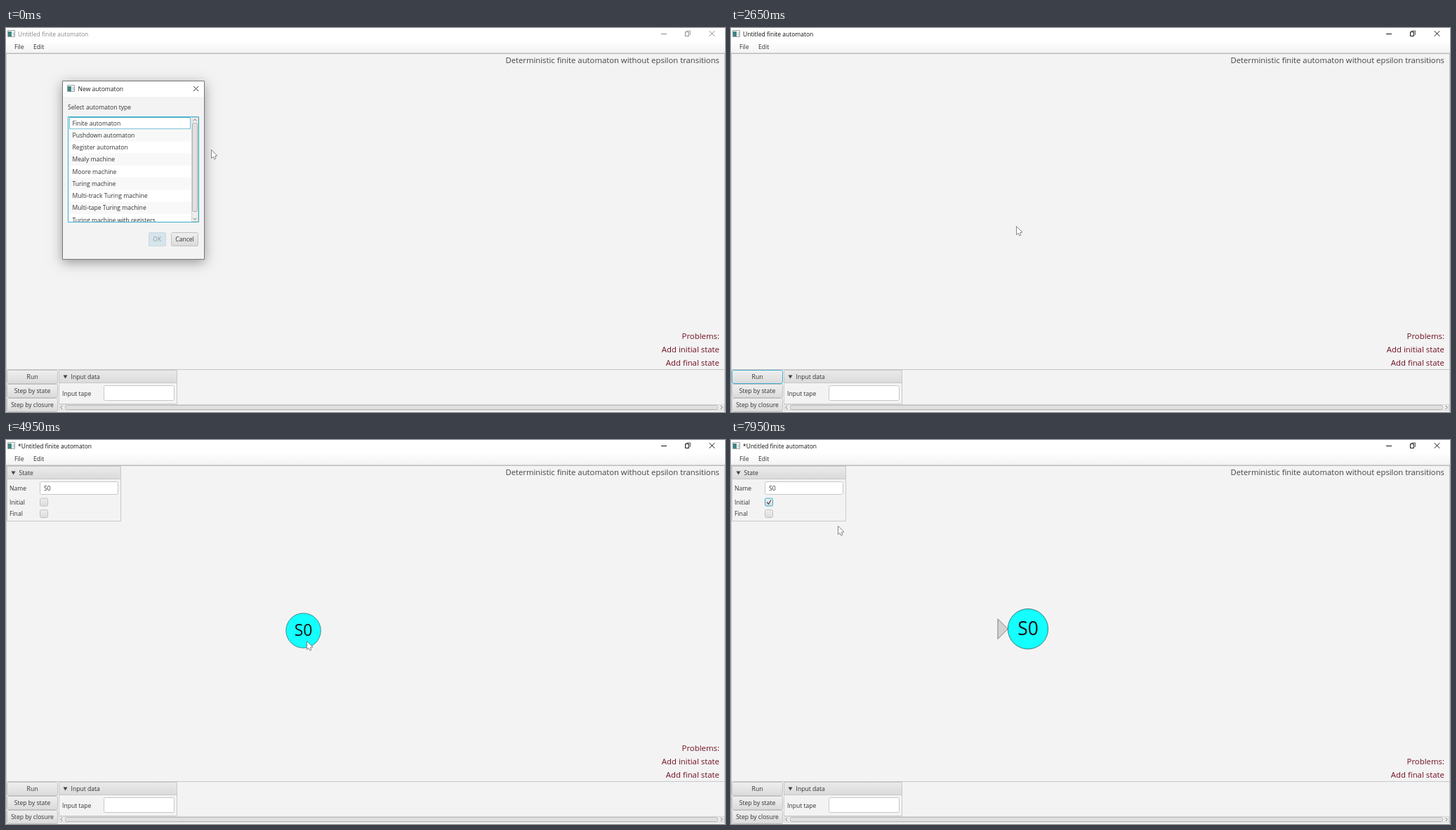
Animation of 1024 by 547 pixels, one loop 8000 ms. Source, as an HTML page with a canvas:

```html
<!DOCTYPE html>
<html lang="en">
<head>
<meta charset="utf-8">
<title>Automaton editor</title>
<style>
html, body { margin: 0; width: 100%; height: 100%; overflow: hidden; background: #f3f3f3; }
canvas { display: block; }
</style>
</head>
<body>
<canvas id="stage" width="1024" height="547"></canvas>
<script>
const ctx = document.getElementById('stage').getContext('2d');
const LOOP = 8000, STEP = 50;
const BLUE = '#159fc4', RING = '#3aaecd', PANE = '#f3f3f3', EDGE = '#c2c2c2', INK = '#333';
const ROW = 17.25;

const clamp = (v, lo, hi) => Math.min(hi, Math.max(lo, v));
const mix = (a, b, k) => a + (b - a) * k;
const ease = k => k * k * (3 - 2 * k);
const progress = (t, from, to) => clamp((t - from) / (to - from), 0, 1);

const TYPES = ['Finite automaton', 'Pushdown automaton', 'Register automaton', 'Mealy machine',
  'Moore machine', 'Turing machine', 'Multi-track Turing machine', 'Multi-tape Turing machine',
  'Turing machine with registers'];

const PICK = 1000, OK_HOVER = 1600, OK_PRESS = 1900, CLOSE = 1950;
const PANE_CLICK = 3100, CREATE = 3800, ZOOM = 4500, CHECK_FOCUS = 7100, CHECK = 7400, MARK = 7600;

// Eased pointer gestures, each starting where the previous one ended
const GESTURES = [
  { from: 750, to: 950, x: 236, y: 137 },
  { from: 1050, to: 1200, x: 243, y: 270 },
  { from: 1200, to: 1550, x: 225, y: 301 },
  { from: 2250, to: 2650, x: 406, y: 282 },
  { from: 2650, to: 2800, x: 425, y: 277 },
  { from: 3900, to: 4150, x: 428, y: 286 },
  { from: 5700, to: 5850, x: 435, y: 279 },
  { from: 5950, to: 6800, x: 53, y: 88 },
  { from: MARK, to: 7950, x: 152, y: 122 }
];

function pointerAt(t) {
  return GESTURES.reduce((p, g) => {
    const k = ease(progress(t, g.from, g.to));
    return { x: mix(p.x, g.x, k), y: mix(p.y, g.y, k) };
  }, { x: 292, y: 173 });
}

function text(str, x, midY, { size = 8.6, color = INK, align = 'left' } = {}) {
  ctx.font = `${size}px "Open Sans", "Noto Sans", sans-serif`;
  ctx.fillStyle = color;
  ctx.textAlign = align;
  ctx.fillText(str, x, midY + size * 0.357);
}

function rect(x, y, w, h, fill) {
  ctx.fillStyle = fill;
  ctx.fillRect(x, y, w, h);
}

function box(x, y, w, h, fill, stroke, radius = 0) {
  ctx.beginPath();
  ctx.roundRect(x + 0.5, y + 0.5, w - 1, h - 1, radius);
  if (fill) { ctx.fillStyle = fill; ctx.fill(); }
  if (stroke) { ctx.strokeStyle = stroke; ctx.lineWidth = 1; ctx.stroke(); }
}

function shade(y, h, top, bottom) {
  const g = ctx.createLinearGradient(0, y, 0, y + h);
  g.addColorStop(0, top);
  g.addColorStop(1, bottom);
  return g;
}

function line(color, width, ...points) {
  ctx.beginPath();
  points.forEach(([x, y]) => ctx.lineTo(x, y));
  ctx.strokeStyle = color;
  ctx.lineWidth = width;
  ctx.stroke();
}

function polygon(points, fill, stroke, width = 1) {
  ctx.beginPath();
  points.forEach(([x, y]) => ctx.lineTo(x, y));
  ctx.closePath();
  ctx.fillStyle = fill;
  ctx.fill();
  if (stroke) { ctx.strokeStyle = stroke; ctx.lineWidth = width; ctx.stroke(); }
}

// An arrowhead pointing along (dx, dy)
function chevron(x, y, dx, dy) {
  const ends = [1, -1].map(s => [x - 1.2 * dx + 2.5 * s * dy, y - 1.2 * dy + 2.5 * s * dx]);
  line('#777', 1, ends[0], [x + 1.2 * dx, y + 1.2 * dy], ends[1]);
}

function cross(x, y, r, color) {
  line(color, 1, [x - r, y - r], [x + r, y + r]);
  line(color, 1, [x + r, y - r], [x - r, y + r]);
}

function windowIcon(x, y) {
  box(x, y, 11, 10, '#fff', '#98a1a5');
  rect(x + 1, y + 2, 5, 7, '#3f8583');
  rect(x + 7, y + 3, 3, 5, '#d3dcdc');
}

function button(label, x, y, w, h, focused) {
  box(x, y, w, h, shade(y, h, '#f0f0f0', '#dadada'), focused ? RING : EDGE, 2);
  text(label, x + w / 2, y + h / 2, { align: 'center' });
}

function field(x, midY, w, h, value = '') {
  box(x, midY - h / 2, w, h, '#fff', '#c8c8c8', 2);
  text(value, x + 6, midY);
}

function titledPane(label, x, y, w, h) {
  const head = 19, mid = y + head / 2;
  box(x, y, w, h, PANE, '#cacaca');
  box(x, y, w, head, shade(y, head, '#ebebeb', '#dadada'), '#c8c8c8');
  polygon([[x + 6.5, mid - 2], [x + 12.5, mid - 2], [x + 9.5, mid + 3]], '#444');
  text(label, x + 17.5, mid);
}

function drawFrame(t) {
  const color = t >= CLOSE ? '#111' : '#8a8a8a';
  rect(0, 0, 1024, 547, PANE);
  rect(0, 0, 1024, 18, '#fff');
  rect(0, 18, 1024, 18, shade(18, 18, '#fff', '#f3f3f3'));
  windowIcon(2, 3);
  text((t >= CREATE ? '*' : '') + 'Untitled finite automaton', 17, 9, { size: 8.5, color });
  line(color, 1, [933, 8.5], [941, 8.5]);
  box(967, 5, 6, 7, null, color);
  line(color, 0.7, [969, 4], [974.5, 4], [974.5, 10]);
  cross(1005.5, 8, 3.8, color);
  text('File', 12, 27);
  text('Edit', 39, 27);

  rect(0, 35.5, 1024, 1.5, '#bcbcbc');
  rect(0, 486, 1024, 1, '#c8c8c8');
  [0, 1023].forEach(x => rect(x, 37, 1, 510, EDGE));
  text('Deterministic finite automaton without epsilon transitions', 1016, 46,
    { size: 11.3, color: '#444', align: 'right' });

  const problems = ['Add final state', ...(t < MARK ? ['Add initial state'] : []), 'Problems:'];
  problems.forEach((s, i) =>
    text(s, 1016, 477 - 19 * i, { size: 11.4, color: '#701022', align: 'right' }));
}

function drawControls(t) {
  const runFocused = t >= OK_PRESS + 150 && t < PANE_CLICK;
  ['Run', 'Step by state', 'Step by closure'].forEach((label, i) =>
    button(label, 1, 487 + 20 * i, 73, 20, !i && runFocused));
  titledPane('Input data', 75, 487, 169, 49);
  text('Input tape', 80, 520.5);
  field(139, 520, 101, 22);
  box(75, 536, 948, 9, '#ececec', '#d6d6d6');
  box(84, 537, 930, 7, '#e0e0e0', '#bababa', 2);
  chevron(79, 540.5, -1, 0);
  chevron(1019, 540.5, 1, 0);
}

function drawList(t) {
  const selected = t >= PICK, focused = t < OK_PRESS;
  ctx.save();
  ctx.beginPath();
  ctx.rect(88, 126, 187, 150);
  ctx.clip();
  TYPES.forEach((name, i) => {
    const y = 127 + i * ROW, current = i === 0;
    rect(88, y, 177, ROW, i % 2 ? '#f8f8f8' : '#fff');
    if (current && selected) rect(89, y, 175, ROW, focused ? BLUE : '#cfcfcf');
    if (current && !selected) box(90, y, 173, ROW, '#fff', '#58b4cd');
    text(name, 94.5, y + ROW / 2, { color: current && selected && focused ? '#fff' : INK });
  });
  ctx.restore();
  box(264, 127, 10, 149, '#ededed', '#d2d2d2');
  box(265, 135, 8, 127, '#e0e0e0', '#b5b5b5', 2);
  chevron(269, 131, 0, -1);
  chevron(269, 272, 0, 1);
  box(88, 126, 187, 151, null, focused ? RING : '#cacaca');
}

function drawOk(t) {
  const pressed = t >= OK_PRESS;
  const tint = pressed ? '#90bfcf' : t >= OK_HOVER ? '#b2d8e4' : '#a7d0de';
  ctx.save();
  ctx.globalAlpha *= t >= PICK ? 1 : 0.4;
  box(203, 291, 25, 20, tint, pressed ? BLUE : '#9dbbc6', 2);
  text('OK', 215.3, 301, { align: 'center' });
  ctx.restore();
}

function drawDialog(t) {
  const fade = progress(t, CLOSE + 100, CLOSE + 250);
  if (fade === 1) return;
  const active = t < CLOSE, scale = 1 - 0.1 * fade;
  ctx.save();
  ctx.globalAlpha = 1 - fade;
  ctx.translate(181, 202);
  ctx.scale(scale, scale);
  ctx.translate(-181, -202);

  ctx.save();
  ctx.shadowColor = `rgba(0,0,0,${active ? 0.38 : 0.22})`;
  ctx.shadowBlur = active ? 16 : 9;
  ctx.shadowOffsetY = active ? 4 : 2;
  rect(80, 75, 203, 255, PANE);
  ctx.restore();
  rect(81, 76, 201, 22, '#fff');
  box(80, 75, 203, 255, null, active ? '#777' : '#a8a8a8');
  windowIcon(87, 81);
  text('New automaton', 102.5, 87, { color: active ? '#222' : '#999' });
  if (active) cross(270.5, 86.5, 3.5, '#333');
  text('Select automaton type', 88, 113);
  drawList(t);
  drawOk(t);
  button('Cancel', 235, 291, 39, 20);
  ctx.restore();
}

function checkBox(midY, focused, checked) {
  box(48, midY - 6, 12, 12, shade(midY - 6, 12, '#eee', '#dcdcdc'), focused ? RING : EDGE, 2);
  if (checked) line('#444', 1.2, [51, midY], [53.5, midY + 2.8], [57, midY - 3]);
}

function drawStatePanel(t) {
  titledPane('State', 1, 37, 163, 79);
  text('Name', 5, 69);
  field(48, 68.5, 112, 19, 'S0');
  text('Initial', 5, 88.5);
  checkBox(88.5, t >= CHECK_FOCUS, t >= CHECK);
  text('Final', 5, 105);
  checkBox(105);
}

// The view zooms around the pointer, five percent per wheel notch.
function drawState(t) {
  const zoom = 1.05 ** clamp(Math.floor((t - ZOOM) / STEP) + 1, 0, 13);
  const x = mix(427.3, 425, zoom), y = mix(286.3, 277.2, zoom), r = 15.2 * zoom;
  if (t >= MARK) {
    polygon([[x - 1.5 * r, y - r / 2], [x - r, y], [x - 1.5 * r, y + r / 2]], '#d2d2d2', '#777', 0.9);
  }
  ctx.beginPath();
  ctx.arc(x, y, r, 0, Math.PI * 2);
  ctx.fillStyle = '#14ffff';
  ctx.fill();
  ctx.strokeStyle = '#2b5c5c';
  ctx.lineWidth = 0.42 * zoom;
  ctx.stroke();
  text('S0', x, y - 0.2 * zoom, { size: 14 * zoom, color: '#111', align: 'center' });
}

// The arrow is one half outline mirrored about its axis.
function drawPointer(t) {
  const { x, y } = pointerAt(t);
  const half = [[11.1, 4.6], [10.1, 1.2], [14, 1.2]];
  const outline = [[0, 0], ...half, ...half.map(([a, b]) => [a, -b]).reverse()];
  ctx.save();
  ctx.translate(x + 0.5, y + 0.5);
  ctx.rotate(Math.PI * 3 / 8);
  polygon(outline, '#fff', '#777', 0.8);
  ctx.restore();
}

function draw(t) {
  drawFrame(t);
  drawControls(t);
  drawDialog(t);
  if (t >= CREATE) {
    drawStatePanel(t);
    drawState(t);
  }
  drawPointer(t);
}

const start = performance.now();
function tick() {
  const t = (performance.now() - start) % LOOP;
  draw(Math.floor(t / STEP) * STEP);
  requestAnimationFrame(tick);
}
tick();
</script>
</body>
</html>
```
